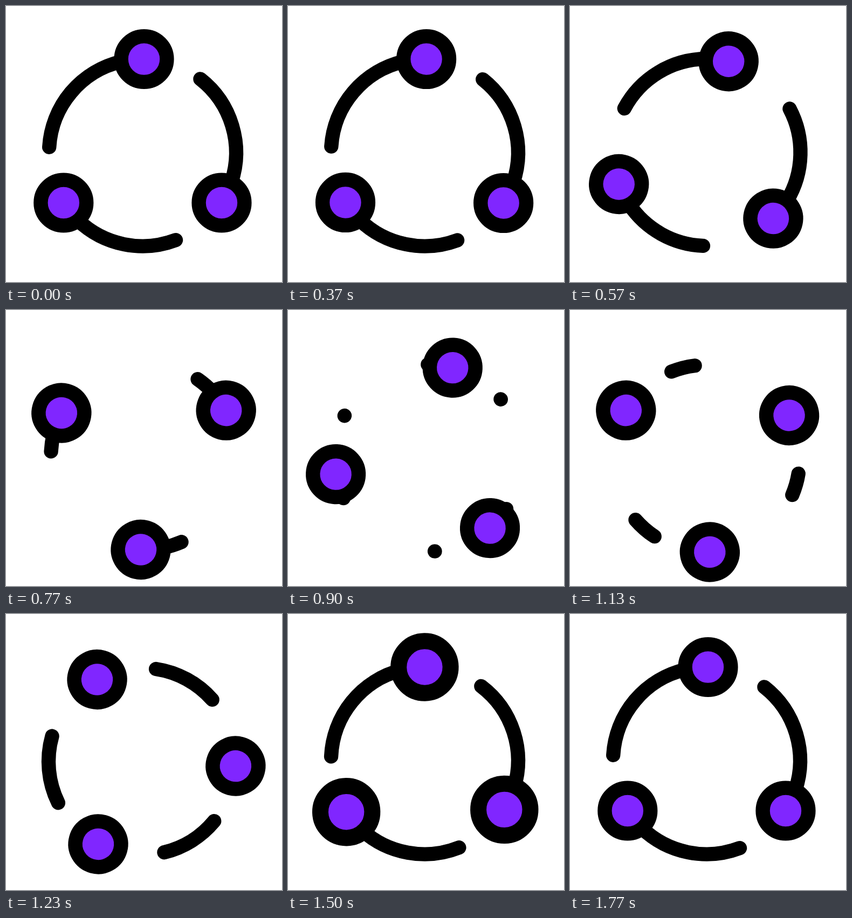
An HTML page with a canvas for the animation above (1830 ms loop, 512 px wide and 512 px high).

```html
<!DOCTYPE html>
<html lang="en">
<head>
<meta charset="utf-8">
<title>Cycle</title>
<style>
  html, body { margin: 0; width: 100%; height: 100%; overflow: hidden; background: #fff; }
  canvas { display: block; width: 512px; height: 512px; }
</style>
</head>
<body>
<canvas id="stage" width="512" height="512"></canvas>
<script>
const ctx = document.getElementById('stage').getContext('2d');
const LOOP = 1830;
const DEG = Math.PI / 180;
const STROKE = 26.4;
const PIVOT = { x: 256, y: 274.5 };
const RING = { x: -2.6, y: -2.5, r: 173.5 };

// Node position relative to the pivot; arc start and span in degrees.
const parts = [
  { x: 0, y: -176, start: 183.4, span: 73.5 },
  { x: 144, y: 90.5, start: 308.1, span: 70.3 },
  { x: -149.2, y: 90.5, start: 69.2, span: 64.4 },
];

// cubic-bezier(2/3, 0, 1/3, 1), solved by bisection.
function ease(x) {
  if (x <= 0) return 0;
  if (x >= 1) return 1;
  let lo = 0, hi = 1;
  for (let i = 0; i < 30; i++) {
    const t = (lo + hi) / 2;
    if (t * (2 - 3 * t + 2 * t * t) < x) lo = t; else hi = t;
  }
  return lo * lo * (3 - 2 * lo);
}

const tween = (tick, from, to) => ease((tick - from) / (to - from));

// 30 ticks per second, switching on whole hundredths of a second.
const tickAt = ms => Math.floor((Math.floor(ms / 10) * 10 + 3.4) * 0.03);

function drawArc({ start, span }, from, to) {
  if (to <= from) return;
  ctx.beginPath();
  ctx.arc(RING.x, RING.y, RING.r, (start + span * from) * DEG, (start + span * to) * DEG);
  ctx.stroke();
}

function drawNode({ x, y }, scale) {
  ctx.beginPath();
  ctx.arc(x, y, 42.4 * scale, 0, 2 * Math.PI);
  ctx.lineWidth = STROKE * scale;
  ctx.fill();
  ctx.stroke();
}

function draw(ms) {
  const tick = tickAt(ms);
  const erased = tween(tick, 10, 30);
  const drawn = tween(tick, 26, 47);
  const scale = 1 + 0.16 * (tween(tick, 41, 47) - tween(tick, 47, 53));

  ctx.fillStyle = '#fff';
  ctx.fillRect(0, 0, 512, 512);
  ctx.save();
  ctx.translate(PIVOT.x, PIVOT.y);
  ctx.rotate(tween(tick, 10, 47) * 2 * Math.PI);
  ctx.strokeStyle = '#000';
  ctx.fillStyle = '#8026ff';
  ctx.lineCap = 'round';
  ctx.lineWidth = STROKE;
  for (const part of parts) {
    drawArc(part, erased, 1);
    drawArc(part, 0, drawn);
  }
  for (const part of parts) drawNode(part, scale);
  ctx.restore();
}

const began = performance.now();
function loop() {
  draw((performance.now() - began) % LOOP);
  requestAnimationFrame(loop);
}
loop();
</script>
</body>
</html>
```
